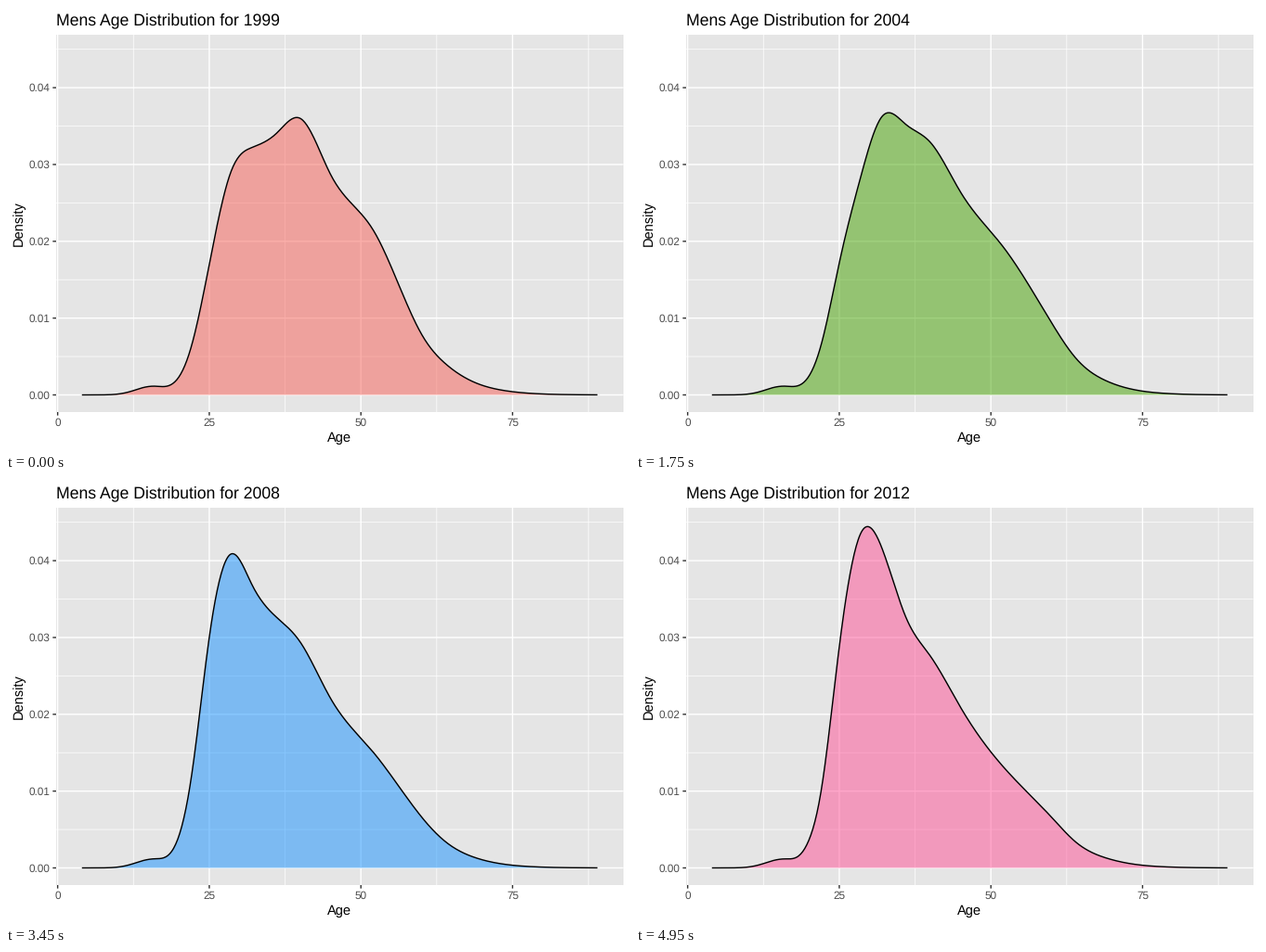
A matplotlib script that plays this animation: 672 by 480 pixels, repeating every 5000 ms.

```python
import numpy as np
import matplotlib.pyplot as plt
from matplotlib.animation import FuncAnimation

plt.rcParams["font.family"] = "Liberation Sans"
plt.rcParams["text.hinting"] = "none"

W, H, DPI = 672, 480, 96
FRAMES, INTERVAL = 100, 50
FIRST, LAST = 1999, 2012
SPAN = LAST - FIRST
LEFT, RIGHT, TOP, BOTTOM = 54, 664.7, 31, 438
PT = 72 / DPI  # points per pixel
PANEL = 229 / 255

# Density in units of 1e-4 at a few ages; the years between are blended.
KEY_AGES = np.array([22, 25, 28.5, 32, 36, 40, 45, 52, 60])
SHAPES = {
    1999: [62, 170, 289, 322, 340, 360, 287, 215, 79],
    2001: [64, 163, 300, 359, 343, 344, 264, 205, 89],
    2003: [65, 172, 283, 362, 352, 329, 264, 193, 94],
    2005: [104, 219, 298, 342, 344, 312, 255, 183, 81],
    2006: [104, 247, 345, 340, 343, 306, 256, 167, 75],
    2009: [122, 327, 440, 384, 319, 288, 203, 143, 62],
    2012: [100, 288, 435, 417, 326, 276, 209, 132, 66],
}
YOUNG = np.arange(4, 21, 2)
OLD = np.arange(64, 90, 5)
AGES = np.linspace(4, 89, 512)


def spline(x, y, t):
    """Natural cubic spline through (x, y), evaluated at t."""
    n, h = len(x), np.diff(x)
    slope = np.diff(y) / h
    a, b = np.eye(n), np.zeros(n)
    for i in range(1, n - 1):
        a[i, i - 1:i + 2] = h[i - 1], 2 * (h[i - 1] + h[i]), h[i]
        b[i] = 6 * (slope[i] - slope[i - 1])
    m = np.linalg.solve(a, b)
    k = np.clip(np.searchsorted(x, t) - 1, 0, n - 2)
    d = t - x[k]
    return (y[k] + d * (slope[k] - h[k] * (2 * m[k] + m[k + 1]) / 6)
            + d ** 2 * m[k] / 2 + d ** 3 * (m[k + 1] - m[k]) / (6 * h[k]))


def px(age):
    return LEFT + (np.asarray(age) + 0.25) * (RIGHT - LEFT) / 93.5


def py(density):
    return 419.5 - np.asarray(density) * 8285


def curve(year):
    mid = [np.interp(year, list(SHAPES), c) for c in zip(*SHAPES.values())]
    # Tails: a steep start with a small teenage bump, and a slow decay.
    d = KEY_AGES[0] - YOUNG
    bump = 11 * np.exp(-((YOUNG - 15.5) / 2.6) ** 2 / 2)
    start = mid[0] * np.exp(-0.42 * d - 0.06 * d ** 2) + bump
    d = OLD - KEY_AGES[-1]
    end = mid[-1] * np.exp(-d / 6.3 - (d / 20) ** 2)
    knots = np.concatenate([YOUNG, KEY_AGES, OLD])
    dens = spline(knots, np.concatenate([start, mid, end]), AGES)
    return np.column_stack([px(AGES), py(np.maximum(dens, 0) * 1e-4)])


def hcl(hue, chroma=100, light=65):
    """Polar CIE LUV to sRGB."""
    angle = np.radians(hue)
    u = chroma * np.cos(angle) / (13 * light) + 0.1978
    v = chroma * np.sin(angle) / (13 * light) + 0.4683
    y = ((light + 16) / 116) ** 3
    x = 9 * y * u / (4 * v)
    z = 3 * y / v - x / 3 - 5 * y
    lin = np.array([[3.2405, -1.5372, -0.4985],
                    [-0.9693, 1.8760, 0.0416],
                    [0.0556, -0.2040, 1.0573]]) @ [x, y, z]
    lin = np.clip(lin, 0, 1)
    lin[0] += 0.04 * lin[1]  # display profile leaks some green into red
    lin = np.clip(lin, 0, 1)
    return np.where(lin < 0.0031, 12.92 * lin, 1.055 * lin ** (1 / 2.4) - 0.055)


YEARS = range(SPAN + 1)
CURVES = [curve(FIRST + k) for k in YEARS]
COLOURS = [hcl(15 + 360 * k / len(YEARS)) ** 1.28 for k in YEARS]
STARTS = [round(k * (FRAMES - 1) / SPAN) for k in YEARS]

fig = plt.figure(figsize=(W / DPI, H / DPI), dpi=DPI, facecolor="white")
ax = fig.add_axes([0, 0, 1, 1])
ax.set(xlim=(0, W), ylim=(H, 0))
ax.axis("off")


def line(xs, ys, colour, width, z):
    return ax.plot(xs, ys, color=colour, lw=width * PT, zorder=z, snap=False,
                   solid_capstyle="butt", solid_joinstyle="round")[0]


def grid(xs, ys, major):
    line(xs, ys, "white", 1.42 if major else 0.71, 2 if major else 1)


def tick(xs, ys):
    line(xs, ys, "#333333", 1.42, 5)


def label(x, y, text, size, colour="black", **kw):
    return ax.text(x, y, text, fontsize=size, color=colour, va="baseline", **kw)


ax.fill([LEFT, RIGHT, RIGHT, LEFT], [TOP, TOP, BOTTOM, BOTTOM],
        color=str(PANEL), lw=0, zorder=0)

for step in range(8):
    x, major = px(step * 12.5), step % 2 == 0
    grid([x, x], [TOP, BOTTOM], major)
    if major:
        tick([x, x], [BOTTOM, BOTTOM + 3.67])
        label(x, 453, f"{step * 12.5:.0f}", 8.8, "#4d4d4d", ha="center")

for step in range(10):
    y, major = py(step * 0.005), step % 2 == 0
    grid([LEFT, RIGHT], [y, y], major)
    if major:
        tick([LEFT - 3.67, LEFT], [y, y])
        label(47.4, y + 4.1, f"{step * 0.005:.2f}", 8.8, "#4d4d4d", ha="right")

label((LEFT + RIGHT) / 2, 470, "Age", 11, ha="center")
label(18, (TOP + BOTTOM) / 2, "Density", 11, ha="center", rotation=90,
      rotation_mode="anchor")
title = label(LEFT, 20, "", 13.2, ha="left")

area, = ax.fill([0, 1, 1], [0, 0, 1], lw=0, alpha=0.5, zorder=3)
outline = line([], [], "black", 1.42, 4)


def draw(frame):
    # The title rounds to the nearest year; the curve waits for its own year.
    year = round(FIRST + SPAN * frame / (FRAMES - 1))
    k = sum(s <= frame for s in STARTS) - 1
    pts, base = CURVES[k], py(0)
    area.set_xy(np.vstack([pts, [pts[-1, 0], base], [pts[0, 0], base]]))
    area.set_facecolor(COLOURS[k])
    outline.set_data(pts[:, 0], pts[:, 1])
    title.set_text(f"Mens Age Distribution for {year}")
    return area, outline, title


anim = FuncAnimation(fig, draw, frames=FRAMES, interval=INTERVAL,
                     repeat=True, repeat_delay=0)
plt.show()
```
